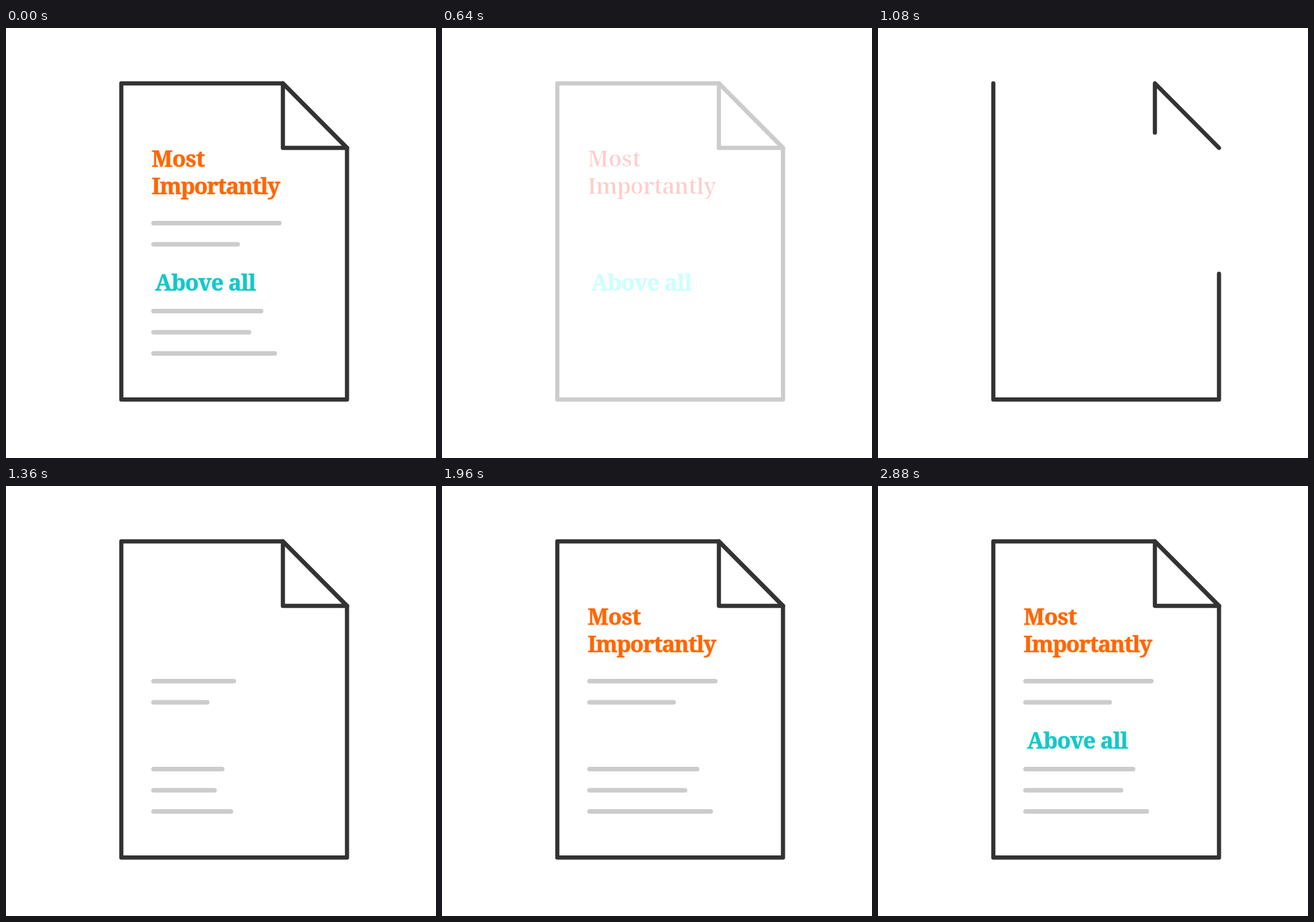
An HTML page that plays this animation: 660 px wide and 660 px high, repeating every 5080 ms.

```html
<!DOCTYPE html>
<html lang="en">
<head>
<meta charset="utf-8">
<title>Document</title>
<style>
  html, body { margin: 0; width: 100%; height: 100%; overflow: hidden; background: #fff; }
  svg { display: block; width: 100%; height: 100%; }
  path { fill: none; stroke-linecap: round; stroke-linejoin: round; }
  #page { stroke-width: 6.4; }
  #rows { stroke-width: 7; }
  text { font: 700 34px "Noto Serif", serif; stroke-width: 1.2px; stroke-linejoin: round; }
</style>
</head>
<body>
<svg viewBox="0 0 660 660">
  <g id="page">
    <path pathLength="1" d="M177 85V570.3H523.4V184L425 85H177"/>
    <path pathLength="1" d="M523.4 184L425 85V184H523.4"/>
  </g>
  <g id="rows">
    <path pathLength="1" d="M226.5 299.5H419.5"/>
    <path pathLength="1" d="M226.5 332H355.5"/>
    <path pathLength="1" d="M226.5 434.5H391.5"/>
    <path pathLength="1" d="M226.5 467H373"/>
    <path pathLength="1" d="M226.5 499.5H412.5"/>
  </g>
  <g id="first">
    <text x="223.5" y="212.5" letter-spacing="-.5">Most</text>
    <text x="223.5" y="254.5" letter-spacing="-1.25">Importantly</text>
  </g>
  <g id="second">
    <text x="229" y="402.5" letter-spacing="-.85">Above all</text>
  </g>
</svg>
<script>
  const LOOP = 5080, TICK = 40;
  const [page, rows, first, second] =
    ["page", "rows", "first", "second"].map(id => document.getElementById(id));
  const INK = [51, 51, 51], GREY = [204, 204, 204];
  const ORANGE = [255, 90, 0], TEAL = [17, 200, 200];

  const rgb = c => `rgb(${c.join(",")})`;
  // Fades move through a coarse palette with 51-unit levels.
  const tint = (c, a) => rgb(a >= 1 ? c :
    c.map(v => Math.round((255 + (v - 255) * a) / 51) * 51));

  function show(el, on) {
    el.style.visibility = on ? "visible" : "hidden";
    return on;
  }

  function strokes(el, color, a, part) {
    if (!show(el, a > 0 && part >= 0)) return;
    el.style.stroke = tint(color, a);
    el.style.strokeDasharray = part < 1 ? `${part} 2` : "none";
  }

  function heading(el, color, full, a, thin) {
    if (!show(el, a > 0)) return;
    el.style.fill = a >= 1 ? full : tint(color, a);
    el.style.stroke = thin ? "#fff" : a >= 1 ? full : tint(color, a);
    el.style.strokeOpacity = thin ? 1 : a >= 1 ? .5 : .25;
    el.style.paintOrder = thin ? "normal" : "stroke";
  }

  const steps = (t, start) => (t - start) / TICK;
  const drawn = (t, start) => {
    const k = steps(t, start);
    return k >= 9 ? 1 : k / 9.4;
  };
  const rise = (t, start, n) => {
    const k = steps(t, start);
    return k < 0 ? 0 : Math.min(1, (k + 1.2) / (n + .2));
  };
  const fall = t => t < 320 ? 1 : t < 680 ? .88 - .09 * steps(t, 320) : 0;

  function render(ms) {
    const t = Math.floor((ms % LOOP) / TICK) * TICK;
    const out = fall(t), early = t < 680;
    strokes(page, INK, early ? out : 1, early ? 1 : drawn(t, 840));
    strokes(rows, GREY, early ? out : 1, early ? 1 : drawn(t, 1120));
    // Very pale rows are lost against the paper.
    if (early && out < .5) show(rows, false);
    heading(first, ORANGE, "#ff6600", early ? out : rise(t, 1720, 7), early && out < .2);
    heading(second, TEAL, "#11c8c8", early ? out : rise(t, 2600, 8), false);
  }

  const began = performance.now();
  function frame() {
    render(performance.now() - began);
    requestAnimationFrame(frame);
  }
  render(0);
  requestAnimationFrame(frame);
</script>
</body>
</html>
```
